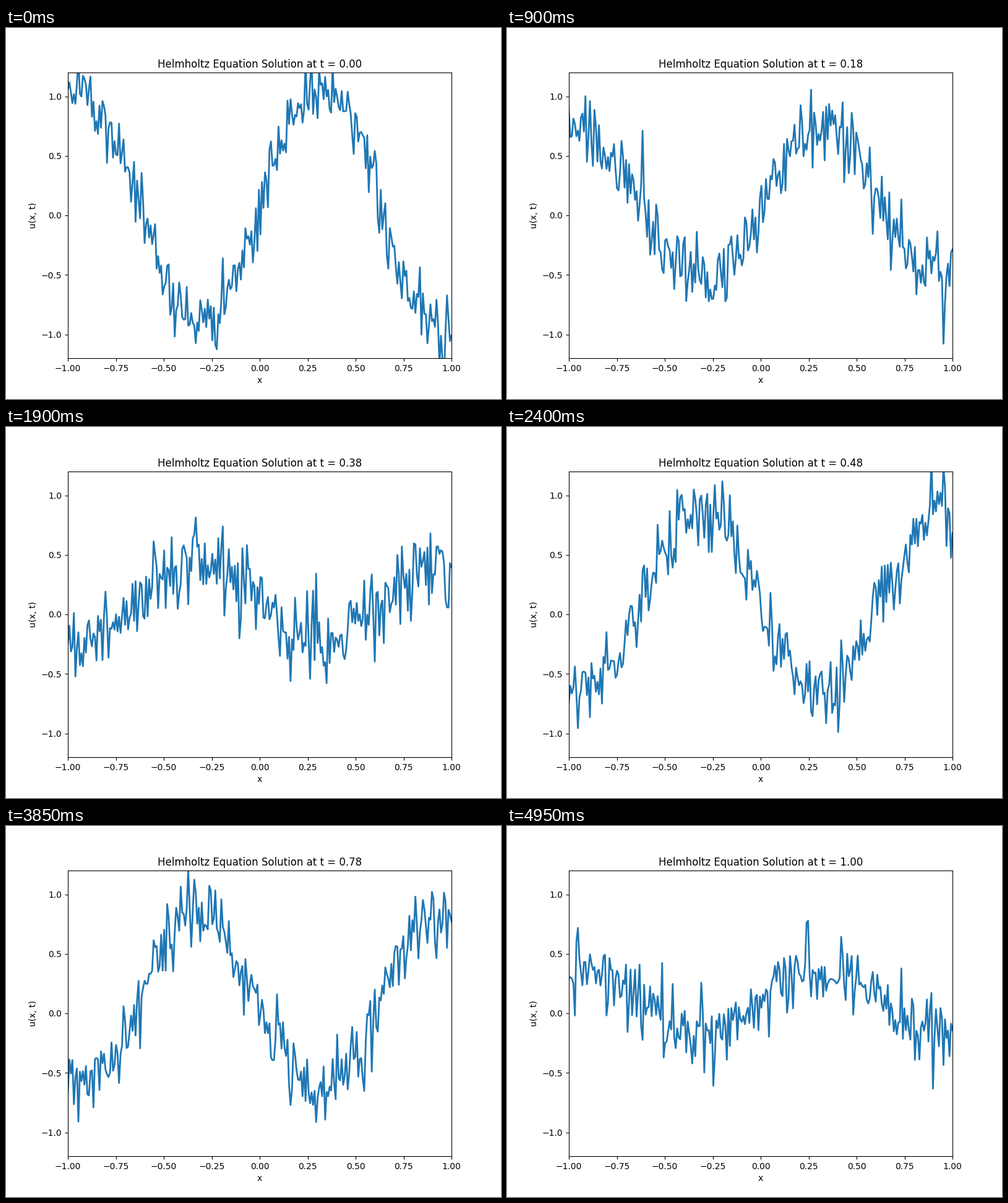
Write a matplotlib script that moves like this. It is 800x600 px and loops after 5000 ms.

```python
import matplotlib.pyplot as plt
import numpy as np
from matplotlib.animation import FuncAnimation

FRAMES = 100
POINTS = 256
K = 5  # wave number, also the angular frequency

x = np.linspace(-1, 1, POINTS)
times = np.linspace(0, 1, FRAMES)
rng = np.random.default_rng(7)
noise = rng.normal(0.1, 0.16, (FRAMES, POINTS))

fig, ax = plt.subplots(figsize=(8, 6), dpi=100)
line, = ax.plot([], [], color="#1f77b4", lw=2)
ax.set_xlim(-1, 1)
ax.set_ylim(-1.2, 1.2)
ax.set_xlabel("x")
ax.set_ylabel("u(x, t)")
title = ax.set_title("")


def update(i):
    t = times[i]
    line.set_data(x, np.sin(K * x) * np.cos(K * t) + noise[i])
    title.set_text(f"Helmholtz Equation Solution at t = {t:.2f}")
    return line, title


anim = FuncAnimation(fig, update, frames=FRAMES, interval=50,
                     repeat=True, repeat_delay=0, blit=False)
plt.show()
```
